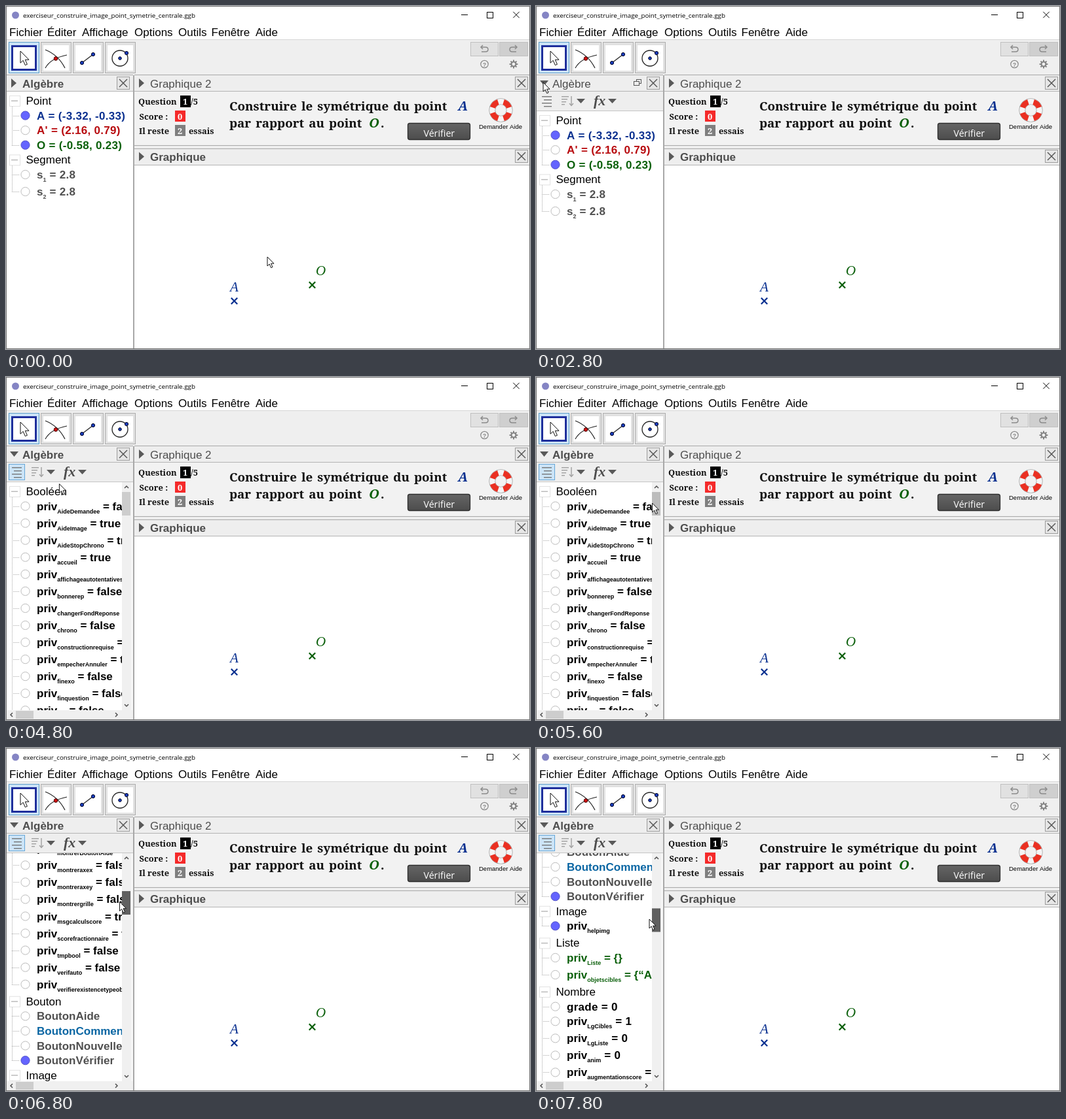
An HTML page with a canvas that plays this animation: 800 by 525 pixels, repeating every 8 s.

```html
<!DOCTYPE html>
<html lang="fr">
<head>
<meta charset="utf-8">
<title>Symétrie centrale</title>
<style>
html, body { margin: 0; width: 100%; height: 100%; overflow: hidden; background: #fff; }
canvas { display: block; width: 800px; height: 525px; }
</style>
</head>
<body>
<canvas id="stage" width="800" height="525"></canvas>
<script>
const ctx = document.getElementById('stage').getContext('2d');
const LOOP = 8000, STEP = 200;
const OPEN_AT = 2800, FULL_AT = 4400, DRAG_AT = 5780;
const SANS = '"Liberation Sans", Arial, sans-serif';
const SERIF = '"Noto Serif", serif';
const MATH = '"Liberation Serif", serif';
const UI = '"Open Sans", sans-serif';
const BLUE = '#0b3190', RED = '#b80c10', GREEN = '#0a5f0a', GREY = '#505050', BLACK = '#000';

// time, x, y of the pointer tip
const POINTER = [[0, 399, 384], [400, 399, 384], [1600, 30, 120], [1800, 26, 116], [2200, 11, 117],
  [3000, 11, 117], [3600, 17, 144], [4400, 17, 144], [5400, 178, 193], [5780, 177, 193],
  [6400, 174, 220], [7200, 173, 251], [7800, 173, 262]];
const SCROLL = [[0, 0], [DRAG_AT, 0], [6400, 248], [7200, 570], [7800, 660]];

// rows: [name, subscript, rest, colour, shown]
const priv = (sub, value, color = BLACK, on = false) => ['priv', sub, value === '' ? '' : ' = ' + value, color, on];
const plain = (text, color, on = false) => [text, '', '', color, on];

const SHORT_TREE = [
  ['Point', [plain('A = (-3.32, -0.33)', BLUE, true), plain("A' = (2.16, 0.79)", RED),
    plain('O = (-0.58, 0.23)', GREEN, true)]],
  ['Segment', [['s', '1', ' = 2.8', GREY, false], ['s', '2', ' = 2.8', GREY, false]]]
];
const FLAGS = 'AideDemandee,AideImage+,AideStopChrono+,accueil+,affichageautotentatives,bonnerep,' +
  'changerFondReponse,chrono,constructionrequise,empecherAnnuler+,finexo,finquestion,init,mauvaiserep,' +
  'montrerBoutonAide,montreraxex,montreraxey,montrergrille,msgcalculscore+,scorefractionnaire,tmpbool,' +
  'verifauto,verifierexistencetypeobjet';
const FULL_TREE = [
  ['Booléen', FLAGS.split(',').map(f => priv(f.replace('+', ''), f.endsWith('+') ? 'true' : 'false'))],
  ['Bouton', [plain('BoutonAide', GREY), plain('BoutonCommencer', '#0a66a3'),
    plain('BoutonNouvelleQuestion', GREY), plain('BoutonVérifier', GREY, true)]],
  ['Image', [priv('helpimg', '', BLACK, true)]],
  ['Liste', [priv('Liste', '{}', GREEN), priv('objetscibles', '{“A', GREEN)]],
  ['Nombre', [plain('grade = 0', BLACK), priv('LgCibles', '1'), priv('LgListe', '0'),
    priv('anim', '0'), priv('augmentationscore', '1'), priv('bonus', '0')]]
];

function track(keys, t, i) {
  const k = keys.findIndex(key => key[0] > t);
  if (k < 0) return keys[keys.length - 1][i];
  const a = keys[k - 1], b = keys[k];
  return a[i] + (b[i] - a[i]) * (t - a[0]) / (b[0] - a[0]);
}

function rect(x, y, w, h, fill, stroke) {
  if (fill) { ctx.fillStyle = fill; ctx.fillRect(x, y, w, h); }
  if (stroke) { ctx.strokeStyle = stroke; ctx.lineWidth = 1; ctx.strokeRect(x + .5, y + .5, w - 1, h - 1); }
}

function line(points, color, width = 1, close = false, fill) {
  ctx.beginPath();
  for (let i = 0; i < points.length; i += 2) ctx.lineTo(points[i], points[i + 1]);
  if (close) ctx.closePath();
  if (fill) { ctx.fillStyle = fill; ctx.fill(); }
  if (color) { ctx.strokeStyle = color; ctx.lineWidth = width; ctx.stroke(); }
}

function disc(x, y, r, fill, stroke, width = 1) {
  ctx.beginPath();
  ctx.arc(x, y, r, 0, 7);
  if (fill) { ctx.fillStyle = fill; ctx.fill(); }
  if (stroke) { ctx.strokeStyle = stroke; ctx.lineWidth = width; ctx.stroke(); }
}

function text(s, x, y, font, color = BLACK) {
  ctx.font = font;
  ctx.fillStyle = color;
  ctx.fillText(s, x, y);
  return x + ctx.measureText(s).width;
}

// numeric labels are set slightly looser than words
function label(s, x, y, color) {
  ctx.letterSpacing = /\d/.test(s) ? '.3px' : '0px';
  const end = text(s, x, y, 'bold 17px ' + SANS, color);
  ctx.letterSpacing = '0px';
  return end;
}

function cross(x, y, r, color, width) {
  line([x - r, y - r, x + r, y + r], color, width);
  line([x - r, y + r, x + r, y - r], color, width);
}

const right = (x, y) => line([x, y - 7, x + 8, y, x, y + 7], null, 0, true, '#595959');
const down = (x, y, w, h) => line([x, y, x + w, y, x + w / 2, y + h], null, 0, true, '#595959');

function arrow(x, y, k = 1) {
  const p = [0, 0, 0, 14, 3.2, 11, 5.6, 16.6, 8, 15.6, 5.6, 10.2, 10, 10.2];
  line(p.map((v, i) => v * k + (i % 2 ? y : x)), '#111', 1, true, '#fff');
}

function closeBox(x, y) {
  rect(x, y, 20, 20, '#e6e6e6', '#9c9c9c');
  cross(x + 10, y + 10, 6, '#555', 1.4);
}

function titleBar() {
  disc(14.5, 14, 5.5, '#8585c4');
  text('exerciseur_construire_image_point_symetrie_centrale.ggb', 26, 17.5, '9.8px ' + UI);
  line([695, 13.5, 705, 13.5], BLACK);
  rect(734, 9, 10, 10, null, BLACK);
  cross(779, 13.5, 4.7, BLACK, 1);
  const menu = { Fichier: 5, 'Éditer': 63, Affichage: 116, Options: 196, Outils: 263, 'Fenêtre': 313.5, Aide: 381 };
  for (const name in menu) text(name, menu[name], 46, '17px ' + SANS);
}

function toolBar() {
  rect(1, 52, 798, 54, '#efefef');
  rect(1, 51, 798, 1, '#d6d6d6');
  for (let i = 0; i < 4; i++) {
    const x = 4 + 49 * i;
    rect(x, 55, 47, 48, i ? '#e1e1e1' : '#cce4f7', i ? '#adadad' : '#5a9bc8');
    rect(x + 4, 60, 39, 39, '#fff');
  }
  ctx.strokeStyle = '#1f2f9c';
  ctx.lineWidth = 3;
  ctx.strokeRect(9.5, 61.5, 36, 36);
  arrow(22, 69, 1.3);

  ctx.strokeStyle = '#222';
  ctx.lineWidth = 1.2;
  ctx.beginPath();
  ctx.moveTo(60, 67);
  ctx.quadraticCurveTo(80, 75, 90, 95);
  ctx.moveTo(60, 95);
  ctx.quadraticCurveTo(68, 80, 93, 75);
  ctx.stroke();
  disc(76, 80.5, 2.8, '#d01010', '#400');
  line([116, 87, 133, 74], '#222', 1.2);
  disc(116, 87, 2.6, '#1a3fc0', '#002');
  disc(133, 74, 2.6, '#1a3fc0', '#002');
  disc(174, 80, 12, null, '#222', 1.3);
  disc(174, 80, 2.3, '#1a3fc0', '#002');
  disc(184, 72, 2.6, '#1a3fc0', '#002');

  rect(709, 55, 43, 22, '#e1e1e1', '#bfbfbf');
  rect(753, 55, 44, 22, '#cfcfcf', '#bfbfbf');
  for (const [x, d] of [[730, 1], [775, -1]]) {
    line([x - 2 * d, 60, x - 5 * d, 63, x - 2 * d, 66], '#8b8b8b', 1.5);
    ctx.beginPath();
    ctx.moveTo(x - 5 * d, 63);
    ctx.lineTo(x + 2 * d, 63);
    ctx.quadraticCurveTo(x + 6 * d, 63, x + 6 * d, 66.5);
    ctx.quadraticCurveTo(x + 6 * d, 70, x + 2 * d, 70);
    ctx.lineTo(x - 4 * d, 70);
    ctx.stroke();
  }
  disc(730.5, 89, 5.7, null, '#8b8b8b', 1.3);
  text('?', 727.8, 92.5, 'bold 9px ' + SANS, '#8b8b8b');
  for (let i = 0; i < 8; i++) {
    const c = Math.cos(i * Math.PI / 4), s = Math.sin(i * Math.PI / 4);
    line([775 + 3 * c, 89 + 3 * s, 775 + 6.4 * c, 89 + 6.4 * s], '#858585', 2);
  }
  disc(775, 89, 3.5, '#efefef', '#858585', 2.2);
}

function header(x, y, w) {
  rect(x, y, w, 25, '#eee');
  rect(x, y - 1, w, 1, '#a8a8a8');
  rect(x, y + 24, w, 1, '#b4b4b4');
}

function lifebuoy(x, y) {
  disc(x, y, 13.2, null, '#888', 9.6);
  disc(x, y, 13.2, null, '#f5f5f5', 8.4);
  ctx.strokeStyle = '#ea3022';
  ctx.lineWidth = 8.4;
  for (let i = 0; i < 4; i++) {
    const a = Math.PI / 4 + i * Math.PI / 2;
    ctx.beginPath();
    ctx.arc(x, y, 13.2, a - .47, a + .47);
    ctx.stroke();
  }
}

function questionView() {
  header(196, 106, 603);
  right(203, 118);
  text('Graphique 2', 220, 125, '17px ' + SANS, '#4d4d4d');
  closeBox(777, 108);
  rect(196, 131, 603, 83, '#f2f2f2');
  rect(196, 213, 603, 1, '#a8a8a8');
  rect(196, 214, 603, 4, '#eee');

  const small = 'bold 12.9px ' + SERIF, big = 'bold 18.8px ' + SERIF, ink = '#111';
  text('Question', 202, 151, small, ink);
  rect(266, 137, 16, 18, BLACK);
  text('1', 270, 151, small, '#fff');
  text('/5', 282, 151, small, ink);
  text('Score :', 203.5, 174, small, ink);
  rect(258, 160, 16, 17, '#f52a2a');
  text('0', 262, 174, small, '#fff');
  text('Il reste', 203, 195.5, small, ink);
  rect(258, 182, 16, 17, '#7f7f7f');
  text('2', 262, 195.5, small, '#fff');
  text('essais', 279, 195.5, small, ink);

  ctx.wordSpacing = '2.2px';
  text('Construire le symétrique du point', 341, 159.5, big, ink);
  text('par rapport au point', 341, 185.5, big, ink);
  ctx.wordSpacing = '0px';
  const italic = 'italic bold 20px ' + SERIF;
  text('A', 690, 159.5, italic, BLUE);
  text('O', 554, 185.5, italic, GREEN);
  text('.', 572, 185.5, big, ink);

  const shade = ctx.createLinearGradient(0, 179, 0, 205);
  shade.addColorStop(0, '#666');
  shade.addColorStop(1, '#4c4c4c');
  ctx.beginPath();
  ctx.roundRect(613.5, 179.5, 95, 25, 3);
  ctx.fillStyle = shade;
  ctx.fill();
  ctx.strokeStyle = '#2f2f2f';
  ctx.lineWidth = 1.3;
  ctx.stroke();
  text('Vérifier', 637.5, 199.5, '14.2px ' + UI, '#fff');
  lifebuoy(755.5, 159.5);
  text('Demander Aide', 722, 188, '9.5px ' + SANS);
}

function graphView() {
  header(196, 219, 603);
  right(203, 230.5);
  text('Graphique', 220, 237, 'bold 17px ' + SANS, '#4d4d4d');
  closeBox(777, 220);
  text('A', 342, 437, 'italic 21px ' + MATH, BLUE);
  text('O', 473, 411.5, 'italic 21px ' + MATH, GREEN);
  cross(348.5, 451.5, 4.7, BLUE, 2.3);
  cross(467.5, 427, 4.7, GREEN, 2.3);
}

function algebraHeader(open, hover) {
  header(1, 106, 193);
  if (open) down(6, 114, 13, 8); else right(8, 118);
  text('Algèbre', 25, 125, (hover ? '' : 'bold ') + '17px ' + SANS, '#4d4d4d');
  if (hover) {
    rect(153, 112, 8, 7, null, '#555');
    rect(149, 115, 9, 7, '#eee', '#555');
  }
  closeBox(169, 108);
}

function styleBar(selected, hover) {
  rect(1, 131, 193, 29, '#eee');
  rect(1, 160, 193, 1, '#c4c4c4');
  if (selected || hover) {
    rect(4, 133, 25, 25, selected ? '#cce4f7' : '#ebf3fa', selected ? '#66a7d8' : '#c3dcee');
  }
  for (let i = 0; i < 4; i++) rect(i % 2 ? 12 : 9, 138 + 5 * i, i % 2 ? 12 : 15, 1.4, '#777');
  for (let i = 0; i < 4; i++) rect(39, 138 + 4 * i, 11 - 2 * i, 1.4, '#a0a0a0');
  line([54, 138, 54, 152], '#a0a0a0', 1.4);
  line([51, 149, 54, 152.5, 57, 149], '#a0a0a0', 1.4);
  down(62, 142, 13, 7);
  text('fx', 88, 152, 'italic bold 22px ' + MATH, '#4d4d4d');
  down(110, 142, 13, 7);
}

function tree(groups, y) {
  for (const [title, rows] of groups) {
    const top = y;
    rect(5, y - 8, 17, 17, '#fff', '#e2e2e2');
    rect(8, y - .5, 10, 1.5, '#bbb');
    text(title, 30.5, y + 6, '17px ' + SANS);
    y += 22.6;
    let last = y;
    for (const [name, sub, rest, color, on] of rows) {
      last = y;
      ctx.setLineDash([1, 1]);
      line([9, Math.round(y) + .5, 21, Math.round(y) + .5], '#aaa');
      ctx.setLineDash([]);
      disc(29.5, y, 6.6, on ? '#6464ff' : '#fff', on ? '#5353c8' : '#bcbcbc');
      let x = label(name, 47, y + 6, color);
      if (sub) x = text(sub, x, y + 11, 'bold 9px ' + SANS, color);
      if (rest) label(rest, x, y + 6, color);
      y += sub ? 26.05 : 22.6;
    }
    ctx.setLineDash([1, 1]);
    line([9.5, top + 9, 9.5, last], '#aaa');
    ctx.setLineDash([]);
  }
}

function scrollBars(scroll, t) {
  rect(177, 161, 14, 349, '#f0f0f0');
  rect(191, 161, 3, 363, '#f7f7f7');
  rect(1, 510, 193, 14, '#f0f0f0');
  const color = t >= DRAG_AT ? '#606060' : t >= 5400 ? '#bcbcbc' : '#cdcdcd';
  rect(177, 176 + scroll / 9.5, 13, 36, color);
  rect(15, 511, 27, 12, '#cdcdcd');
  line([181, 170, 184, 167, 187, 170], '#505050', 1.5);
  line([181, 501, 184, 504, 187, 501], '#505050', 1.5);
  line([10, 514, 7, 517, 10, 520], '#505050', 1.5);
  line([167, 514, 170, 517, 167, 520], '#505050', 1.5);
}

function algebraView(t, px, py) {
  const open = t >= OPEN_AT, full = t >= FULL_AT;
  const scroll = track(SCROLL, t, 1);
  ctx.save();
  ctx.beginPath();
  ctx.rect(1, open ? 161 : 131, full ? 176 : 193, full ? 349 : 392);
  ctx.clip();
  tree(full ? FULL_TREE : SHORT_TREE, (open ? 175 : 145) - scroll);
  ctx.restore();
  if (full) scrollBars(scroll, t);
  if (open) styleBar(full, px < 30 && py > 132);
  algebraHeader(open, px < 194 && py > 105 && py < 131);
  rect(194, 106, 2, 418, '#a8a8a8');
}

function draw(t) {
  const px = track(POINTER, t, 1), py = track(POINTER, t, 2);
  rect(0, 0, 800, 525, '#fff');
  titleBar();
  toolBar();
  questionView();
  graphView();
  algebraView(t, px, py);
  rect(0, 0, 800, 525, null, '#747474');
  arrow(px, py);
}

function tick(now) {
  draw(Math.floor(now % LOOP / STEP) * STEP);
  requestAnimationFrame(tick);
}
requestAnimationFrame(tick);
</script>
</body>
</html>
```
